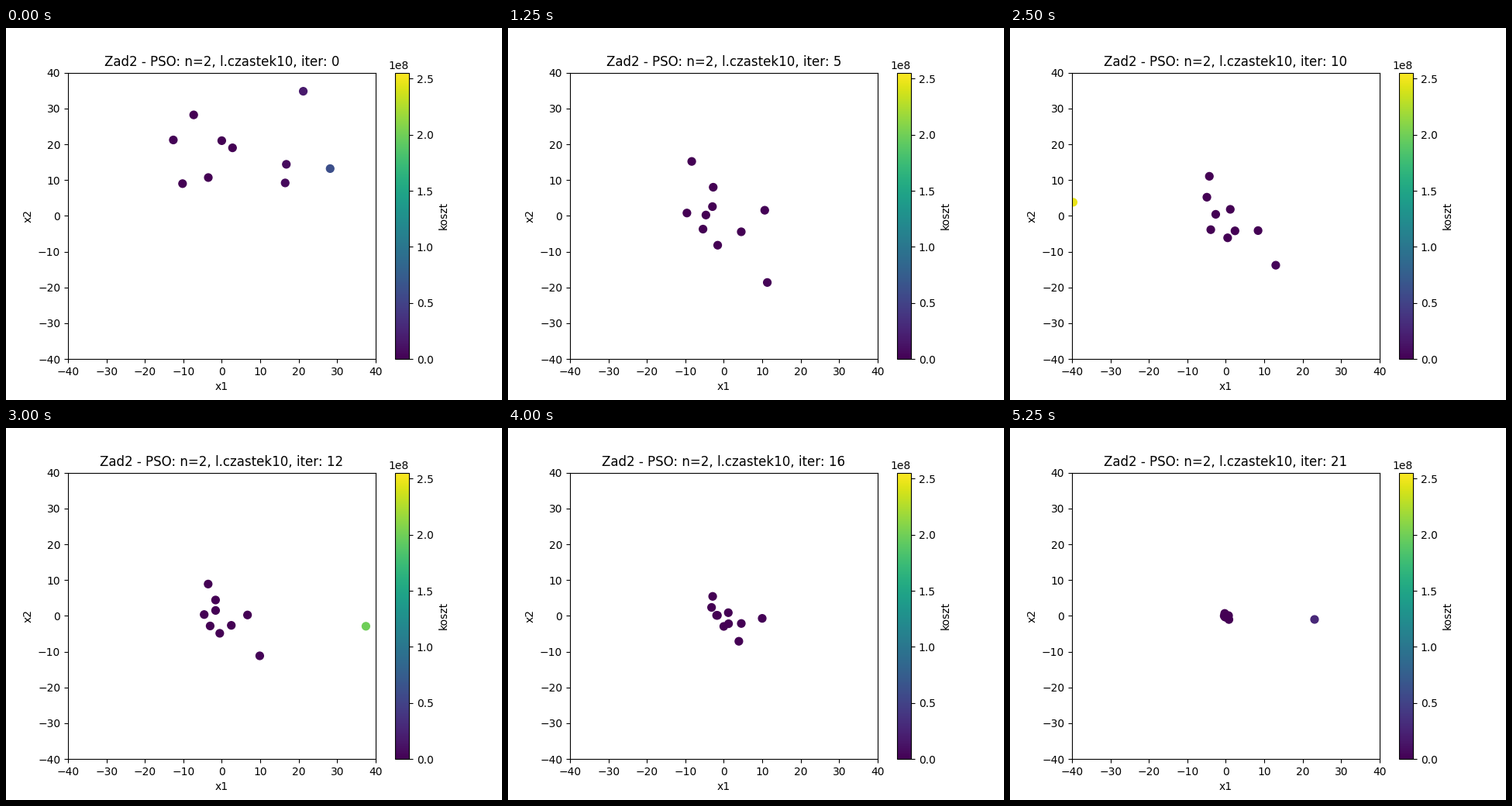
A matplotlib script for the animation above (5500 ms loop, 640 by 480 pixels).

```python
import numpy as np
import matplotlib.pyplot as plt
from matplotlib.animation import FuncAnimation

STEPS, INTERVAL, LIMIT = 22, 250, 40
TURN = 3  # step at which the first rush ends and the swarm starts to close in

START = np.array([(-7.3, 28.2), (-12.6, 21.2), (0, 21), (2.8, 19), (-10.2, 9),
                  (-3.5, 10.7), (16.8, 14.4), (16.5, 9.2), (21.2, 34.8)])
RUSHED = np.array([(-8, 17.4), (-6.7, 7.6), (.3, 2.9), (-.4, -9.5), (-7.2, .4),
                   (-5.7, -3), (4.4, -6.1), (15, -3.2), (16.7, -23.1)])
# Turning points of the one particle that keeps overshooting: step, x1, x2.
STRAY = np.array([(0, 28.2, 13.2), (3, -27.6, -5.2), (7, 16.8, -2.2), (10, -39.7, 3.8),
                  (12, 37.5, -2.9), (16, 10, -.7), (21, 23.1, -1)])

rng = np.random.default_rng(4)
SWAY = rng.normal(0, 2.2, START.shape)
PACE = rng.uniform(.5, 1, START.shape)


def cost(points):
    """Rosenbrock function."""
    x1, x2 = points.T
    return 100 * (x2 - x1**2) ** 2 + (1 - x1) ** 2


def swarm(step):
    """Rush towards the minimum, then sway while the spread shrinks linearly."""
    rush = min(step / TURN, 1)
    after = max(step - TURN, 0)
    spread = 1 - .96 * after / (STEPS - 1 - TURN)
    group = START + (RUSHED - START) * rush
    group = spread * (group + SWAY * np.sin(PACE * after))
    stray = [np.interp(step, STRAY[:, 0], STRAY[:, axis]) for axis in (1, 2)]
    return np.vstack([group, stray])


fig, ax = plt.subplots(figsize=(6.4, 4.8), dpi=100)
start = swarm(0)
dots = ax.scatter(*start.T, c=cost(start), s=50, cmap="viridis", vmin=0, vmax=2.553e8)
fig.colorbar(dots, label="koszt")
ax.set(xlim=(-LIMIT, LIMIT), ylim=(-LIMIT, LIMIT), xlabel="x1", ylabel="x2")


def update(step):
    points = swarm(step)
    dots.set_offsets(points)
    dots.set_array(cost(points))
    ax.set_title(f"Zad2 - PSO: n=2, l.czastek10, iter: {step}")
    return [dots]


anim = FuncAnimation(fig, update, frames=STEPS, interval=INTERVAL,
                     repeat=True, repeat_delay=0)
plt.show()
```
